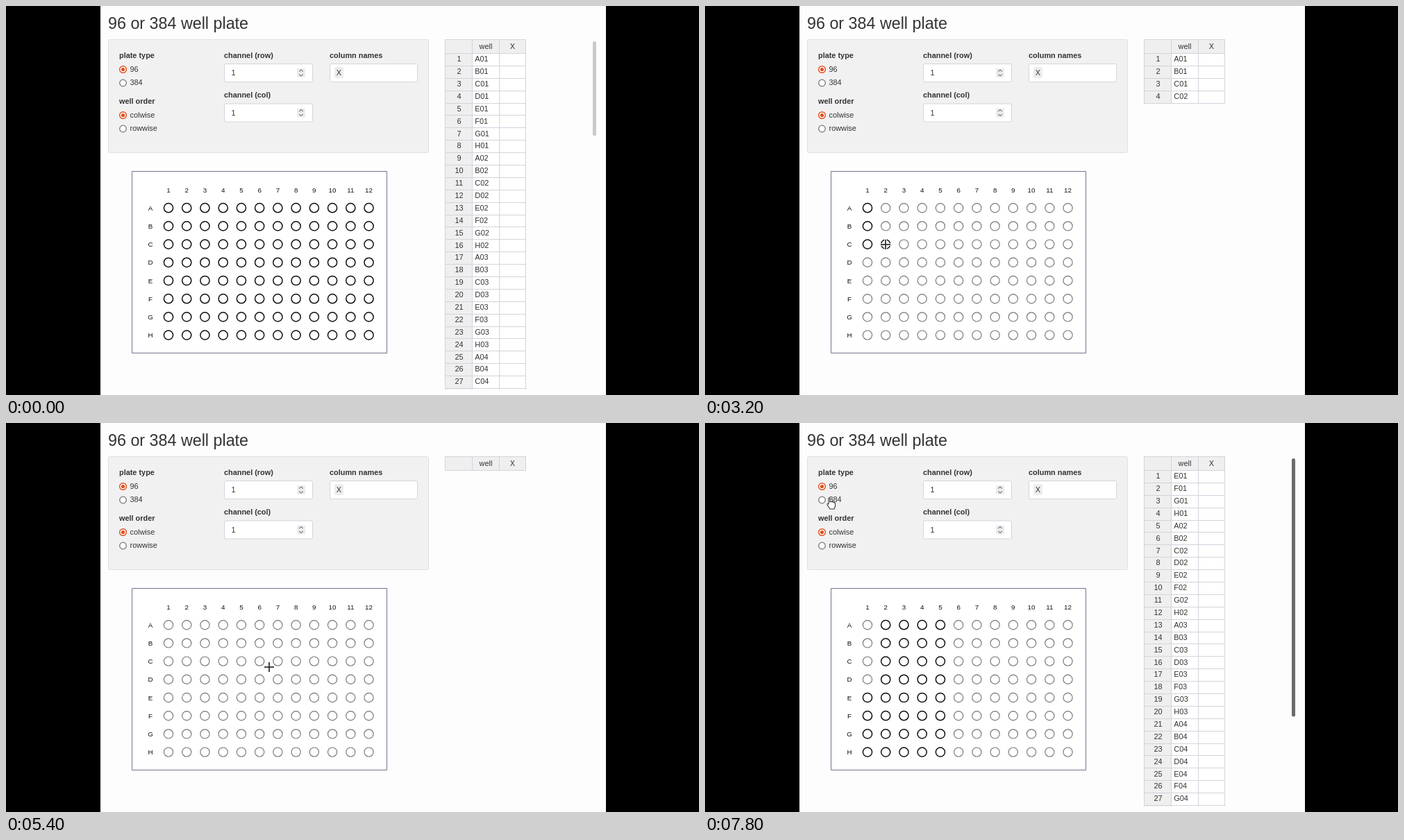
Write an HTML page with a canvas that moves like this. It is 998 by 561 pixels and loops after 8 s.

```html
<!DOCTYPE html>
<html lang="en">
<head>
<meta charset="utf-8">
<title>Well plate</title>
<style>
  html, body { margin: 0; width: 100%; height: 100%; overflow: hidden; background: #000; }
  canvas { display: block; }
</style>
</head>
<body>
<canvas id="stage" width="998" height="561"></canvas>
<script>
const ctx = document.getElementById('stage').getContext('2d');
const LOOP = 8000, TICK = 200;
const FONT = '"Liberation Sans", Arial, sans-serif';
const ROWS = 'ABCDEFGH', COLS = 12;
const PAGE = '#fdfdfd', PANEL = '#f1f1f1', LINE = '#d3d3de', INK = '#333';

// Each event selects all wells up to a column, or toggles a single well.
const EVENTS = [
  { at: 0, fill: 12 }, { at: 1800, fill: 0 },
  { at: 2200, well: 'A1' }, { at: 2600, well: 'B1' }, { at: 3000, well: 'C1' },
  { at: 3200, well: 'C2' }, { at: 3600, well: 'B2' }, { at: 3800, well: 'A2' },
  { at: 5200, fill: 0 }, { at: 6200, fill: 5 },
  { at: 6600, well: 'A1' }, { at: 6800, well: 'B1' },
  { at: 7000, well: 'C1' }, { at: 7400, well: 'D1' }
];

// Pointer keys: time, x, y
const PATH = [
  [600, 858, 300], [1000, 560, 150], [1400, 343, 87], [1800, 300, 277],
  [2200, 236, 293], [2400, 240, 323], [2600, 237, 319], [2800, 236, 342],
  [3000, 238, 345], [3200, 260, 344], [3400, 261, 326], [3600, 261, 317],
  [3800, 262, 292], [4000, 279, 279], [4800, 377, 350], [5400, 379, 352],
  [5600, 352, 486], [6000, 220, 278], [6400, 236, 292], [6600, 237, 318],
  [6800, 237, 321], [7000, 237, 344], [7200, 237, 369], [7400, 236, 370],
  [7600, 200, 200], [7800, 181, 114]
];

function selectedWells(time) {
  const wells = new Set();
  for (const { at, fill, well } of EVENTS) {
    if (at > time) break;
    if (well) {
      if (!wells.delete(well)) wells.add(well);
      continue;
    }
    wells.clear();
    for (let c = 1; c <= fill; c++) for (const r of ROWS) wells.add(r + c);
  }
  return wells;
}

function pointerAt(time) {
  if (time < PATH[0][0]) return null;
  const next = PATH.findIndex(key => key[0] > time);
  if (next < 0) return PATH[PATH.length - 1].slice(1);
  const [t0, x0, y0] = PATH[next - 1], [t1, x1, y1] = PATH[next];
  const k = (time - t0) / (t1 - t0);
  return [x0 + (x1 - x0) * k, y0 + (y1 - y0) * k];
}

function text(str, x, y, { size = 10.9, bold = false, align = 'left', color = INK } = {}) {
  ctx.font = `${bold ? 'bold ' : ''}${size}px ${FONT}`;
  ctx.textAlign = align;
  ctx.fillStyle = color;
  ctx.fillText(str, x, y);
}

function box(x, y, w, h, fill, stroke, radius = 0) {
  ctx.beginPath();
  ctx.roundRect(x, y, w, h, radius);
  if (fill) { ctx.fillStyle = fill; ctx.fill(); }
  if (stroke) { ctx.lineWidth = 1; ctx.strokeStyle = stroke; ctx.stroke(); }
}

function circle(x, y, r, fill, stroke, width = 1) {
  ctx.beginPath();
  ctx.arc(x, y, r, 0, Math.PI * 2);
  if (fill) { ctx.fillStyle = fill; ctx.fill(); }
  if (stroke) { ctx.lineWidth = width; ctx.strokeStyle = stroke; ctx.stroke(); }
}

function line(points, color, width = 1) {
  ctx.beginPath();
  points.forEach(([x, y]) => ctx.lineTo(x, y));
  ctx.strokeStyle = color;
  ctx.lineWidth = width;
  ctx.stroke();
}

function radio(label, y, checked) {
  if (checked) {
    circle(168.5, y, 4.8, '#fff', '#e2501f', 1.5);
    circle(168.5, y, 2.6, '#e2501f');
  } else {
    circle(168.5, y, 4.8, '#fff', '#77777c', 1.3);
  }
  text(label, 178.5, y + 3);
}

function numberInput(label, y) {
  text(label, 314, y - 8.5, { bold: true });
  box(314.5, y + .5, 127, 26, '#fff', LINE, 2);
  text('1', 324.5, y + 17);
  box(419, y + 7, 12, 13, '#ececee', null, 1);
  for (const dir of [-1, 1]) {
    const mid = y + 13.5 + dir * 3;
    line([[422.3, mid - dir], [425, mid + dir * 1.6], [427.7, mid - dir]], '#77777c', 1.1);
  }
}

function drawControls() {
  text('96 or 384 well plate', 147, 33, { size: 23.3 });
  box(147.5, 48.5, 461, 163, PANEL, '#dedee8', 2);
  text('plate type', 163, 74.5, { bold: true });
  radio('96', 91.5, true);
  radio('384', 111, false);
  text('well order', 163, 140.5, { bold: true });
  radio('colwise', 157.5, true);
  radio('rowwise', 177, false);
  numberInput('channel (row)', 83);
  numberInput('channel (col)', 140.5);
  text('column names', 466, 74.5, { bold: true });
  box(466.5, 83.5, 126, 26, '#fff', LINE, 2);
  box(473, 88, 13, 16, '#ededed', null, 2);
  text('X', 479.3, 100, { align: 'center' });
}

function drawPlate(wells) {
  const label = { size: 9.8, align: 'center', color: '#111' };
  const cx = c => 234 + 26.23 * c, cy = r => 291.2 + 26.2 * r;
  box(181.5, 238.5, 367, 262, '#fff', '#74748e');
  for (let c = 0; c < COLS; c++) text(c + 1, cx(c), 268.7, label);
  [...ROWS].forEach((name, r) => {
    text(name, 208, cy(r) + 3.6, label);
    for (let c = 0; c < COLS; c++) {
      const on = wells.has(name + (c + 1));
      circle(cx(c), cy(r), 6.6, null, on ? '#111' : '#77777a', on ? 1.5 : 1.15);
    }
  });
}

function drawTable(wells, time) {
  const names = [];
  for (let c = 1; c <= COLS; c++)
    for (const r of ROWS)
      if (wells.has(r + c)) names.push(r + String(c).padStart(2, '0'));

  const top = 48.5, head = 68.5, pitch = 17.89, limit = 553;
  const bottom = Math.min(head + pitch * names.length, limit);
  const center = { align: 'center' };
  ctx.save();
  ctx.beginPath();
  ctx.rect(632, 48, 118, limit - 48);
  ctx.clip();
  box(632.5, top, 116, head - top, '#efefef');
  box(632.5, head, 39, bottom - head, '#efefef');
  box(671.5, head, 77, bottom - head, '#fff');
  text('well', 691, 61.5, center);
  text('X', 729.5, 61.5, center);
  line([[632, top], [749, top]], LINE);
  line([[632, head], [749, head]], LINE);
  names.forEach((name, i) => {
    const y = head + pitch * i;
    if (y > limit) return;
    text(i + 1, 652.5, y + 11.7, center);
    text(name, 675.3, y + 11.7);
    const rule = Math.floor(y + pitch) + .5;
    line([[632, rule], [749, rule]], LINE);
  });
  for (const x of [632.5, 671.5, 710.5, 748.5]) line([[x, top], [x, bottom + .5]], LINE);
  ctx.restore();

  const view = 504, content = 20 + pitch * names.length;
  if (content > view) {
    box(845, 51, 5, view * view / content - 10, time < 600 ? '#cacaca' : '#6b6b6b', null, 2.5);
  }
}

function outlined(path, fill) {
  ctx.lineJoin = 'round';
  ctx.strokeStyle = '#333';
  ctx.lineWidth = 1.1;
  ctx.fillStyle = fill;
  const shape = new Path2D(path);
  ctx.fill(shape);
  ctx.stroke(shape);
}

function drawPointer(x, y) {
  const inside = (l, t, r, b) => x >= l && x <= r && y >= t && y <= b;
  ctx.save();
  ctx.translate(Math.round(x), Math.round(y));
  if (inside(181, 238, 549, 501)) {
    for (const [color, width, arm] of [['#ffffffcc', 4, 8], ['#333', 1.8, 7]]) {
      line([[-arm, 0], [arm, 0]], color, width);
      line([[0, -arm], [0, arm]], color, width);
    }
  } else if (inside(314, 83, 442, 110)) {
    for (const [color, width] of [['#ffffffcc', 3], ['#555', 1.3]]) {
      line([[0, -6], [0, 6]], color, width);
      for (const end of [-6, 6]) line([[-3, end], [3, end]], color, width);
    }
  } else if (inside(163, 84, 220, 120)) {
    outlined('M-3-5Q-2-7-1-5V0Q1-2 2 0Q4-1 4.5 1Q6.5 0 6.5 2.5V6L5 10H-1L-5 4Q-5 1-3 3Z', '#fff');
  } else {
    outlined('M0 0V14L3.4 11L5.7 16L8 15L5.8 10H10.2Z', '#222');
  }
  ctx.restore();
}

function draw(now) {
  const time = Math.floor(now % LOOP / TICK) * TICK;
  const wells = selectedWells(time), pointer = pointerAt(time);
  ctx.fillStyle = '#000';
  ctx.fillRect(0, 0, 998, 561);
  ctx.fillStyle = PAGE;
  ctx.fillRect(136, 0, 728, 561);
  drawControls();
  drawPlate(wells);
  drawTable(wells, time);
  if (pointer) drawPointer(...pointer);
}

const start = performance.now();
function tick() {
  draw(performance.now() - start);
  requestAnimationFrame(tick);
}
tick();
</script>
</body>
</html>
```
